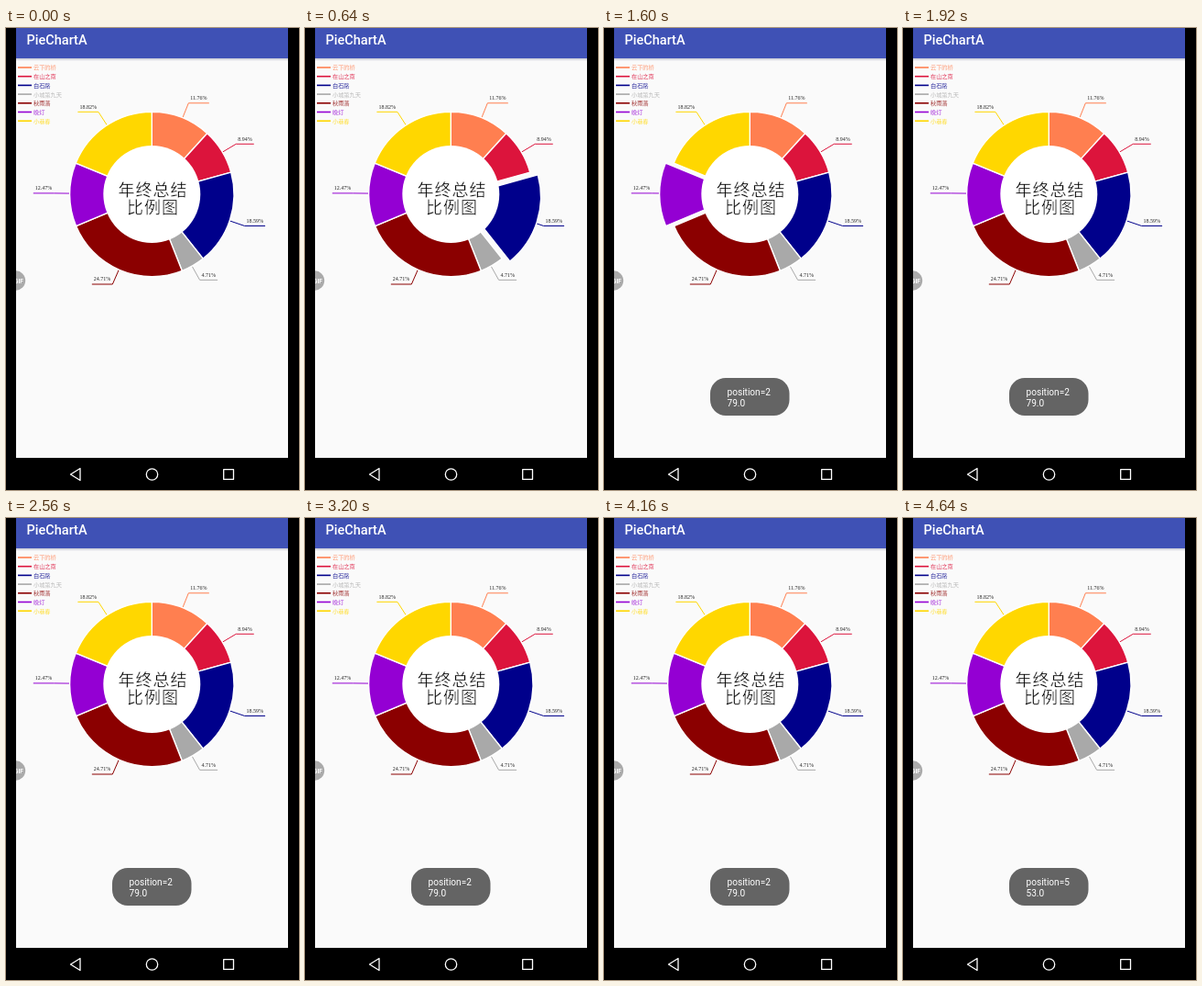
An HTML page for the animation above (4.8 s loop, 320 px wide and 503 px high).

```html
<!DOCTYPE html>
<html lang="zh">
<head>
<meta charset="utf-8">
<title>PieChartA</title>
<style>
  html, body { margin: 0; width: 100%; height: 100%; overflow: hidden; background: #000; }
  svg { display: block; width: 100%; height: 100%; }
  .ui { font-family: Roboto, sans-serif; fill: #fff; }
  .cjk { font-family: "Noto Sans CJK SC", "Noto Sans CJK", sans-serif; }
  .legend { font-size: 6.2px; stroke: #fafafa; stroke-width: 0.12px; }
  .percent { font: 6px "Liberation Serif", serif; fill: #222; }
  /* The white outline thins the strokes to a brush-like weight. */
  .heading { font-size: 18px; letter-spacing: 1px; text-anchor: middle; stroke: #fff; stroke-width: 0.4px; }
</style>
</head>
<body>
<svg viewBox="0 0 320 503">
  <defs>
    <linearGradient id="shadow" x2="0" y2="1">
      <stop stop-color="#c3c5d2"/>
      <stop offset="1" stop-color="#fafafa"/>
    </linearGradient>
    <clipPath id="screen"><rect x="11" width="297" height="468"/></clipPath>
  </defs>

  <rect width="320" height="503"/>
  <rect x="11" width="297" height="468" fill="#fafafa"/>
  <rect x="11" y="33" width="297" height="3" fill="url(#shadow)"/>
  <rect x="11" width="297" height="33" fill="#3f51b5"/>
  <text class="ui" x="22.5" y="18" font-size="14.5" font-weight="500">PieChartA</text>

  <g id="legend"></g>
  <g id="pointers"></g>
  <g id="slices" stroke="#fff" stroke-width="1.4"></g>
  <circle cx="159.3" cy="181" r="53" fill="#fff"/>
  <g class="cjk heading">
    <text x="160.5" y="182.5">年终总结</text>
    <text x="160.5" y="201.5">比例图</text>
  </g>

  <g clip-path="url(#screen)">
    <circle cx="10.5" cy="275" r="10.7" fill="#aaa"/>
    <text class="ui" x="9" y="277.5" font-size="6.5" font-weight="700">GIF</text>
  </g>

  <g id="toast" class="ui" font-size="10.1">
    <rect x="116" y="381" width="86.5" height="41" rx="17" fill="#646464"/>
    <text id="toastPosition" x="134.5" y="399.5"></text>
    <text id="toastValue" x="134.5" y="411.5"></text>
  </g>

  <g fill="none" stroke="#fff" stroke-width="1.3" stroke-linejoin="round">
    <path d="M81 479.5V492.5L70.5 486Z"/>
    <circle cx="159.5" cy="486" r="6.2"/>
    <rect x="237.7" y="480.6" width="10.8" height="10.8"/>
  </g>
</svg>

<script>
const data = [
  { name: "云下的桥", value: 50, color: "#ff7f50" },
  { name: "在山之南", value: 38, color: "#dc143c" },
  { name: "白石路", value: 79, color: "#00008b" },
  { name: "小城第九天", value: 20, color: "#a9a9a9" },
  { name: "秋雨落", value: 105, color: "#8b0000" },
  { name: "晚灯", value: 53, color: "#9400d3" },
  { name: "小巷春", value: 80, color: "#ffd700" }
];
const total = data.reduce((sum, item) => sum + item.value, 0);
const center = { x: 159.3, y: 181 };
const radius = 89.7, elbowRadius = 107, popDistance = 9;
const pointerTurn = 0.8 * Math.PI / 180;
const loop = 4800, step = 160, tapLength = 320;
const taps = [
  { at: 640, slice: 2 }, { at: 1600, slice: 5 }, { at: 2240, slice: 6 },
  { at: 2880, slice: 0 }, { at: 3840, slice: 4 }
];

const byId = id => document.getElementById(id);

function add(parent, tag, attributes, text = "") {
  const node = document.createElementNS("http://www.w3.org/2000/svg", tag);
  for (const key in attributes) node.setAttribute(key, attributes[key]);
  node.textContent = text;
  return byId(parent).appendChild(node);
}

// Angles run clockwise from the top, in radians.
const polar = (angle, r) => [center.x + r * Math.sin(angle), center.y - r * Math.cos(angle)];

function addLegend(item, index) {
  const y = 43 + index * 9.7;
  add("legend", "path", { d: `M13 ${y}H28`, stroke: item.color, "stroke-width": 1.6 });
  add("legend", "text", { class: "cjk legend", x: 30, y: y + 2.4, fill: item.color }, item.name);
}

function addPointer(item) {
  const label = (item.value / total * 100).toFixed(2) + "%";
  const direction = item.middle + pointerTurn;
  const [x, y] = polar(direction, elbowRadius);
  const length = label.length * 3 + 4.5;
  const end = direction < Math.PI ? x + length : x - length;
  add("pointers", "path", {
    d: `M${polar(direction, radius - 2)}L${x} ${y}H${end}`,
    fill: "none", stroke: item.color, "stroke-width": 1
  });
  add("pointers", "text", { class: "percent", x: Math.min(x, end) + 2, y: y - 3.7 }, label);
}

let angle = 0;
data.forEach((item, index) => {
  const start = angle;
  angle += item.value / total * Math.PI * 2;
  item.middle = (start + angle) / 2;
  item.node = add("slices", "path", {
    d: `M${center.x} ${center.y}L${polar(start, radius)}A${radius} ${radius} 0 0 1 ${polar(angle, radius)}Z`,
    fill: item.color
  });
  addLegend(item, index);
  addPointer(item);
});

function toastOpacity(time) {
  if (time < 800) return 0;
  if (time < 1120) return time < 960 ? 0.35 : 0.75;
  return time >= 4320 && time < 4640 ? 0.5 : 1;
}

function render(now) {
  const time = Math.floor(now % loop / step) * step;
  const tap = taps.find(({ at }) => time >= at && time < at + tapLength);
  data.forEach((item, index) => {
    const shift = tap && tap.slice === index ? popDistance : 0;
    const dx = shift * Math.sin(item.middle), dy = -shift * Math.cos(item.middle);
    item.node.setAttribute("transform", `translate(${dx} ${dy})`);
  });

  const position = time < 4480 ? 2 : 5;
  byId("toast").setAttribute("opacity", toastOpacity(time));
  byId("toastPosition").textContent = "position=" + position;
  byId("toastValue").textContent = data[position].value.toFixed(1);
}

const startTime = performance.now();
function tick() {
  render(performance.now() - startTime);
  requestAnimationFrame(tick);
}
tick();
</script>
</body>
</html>
```
